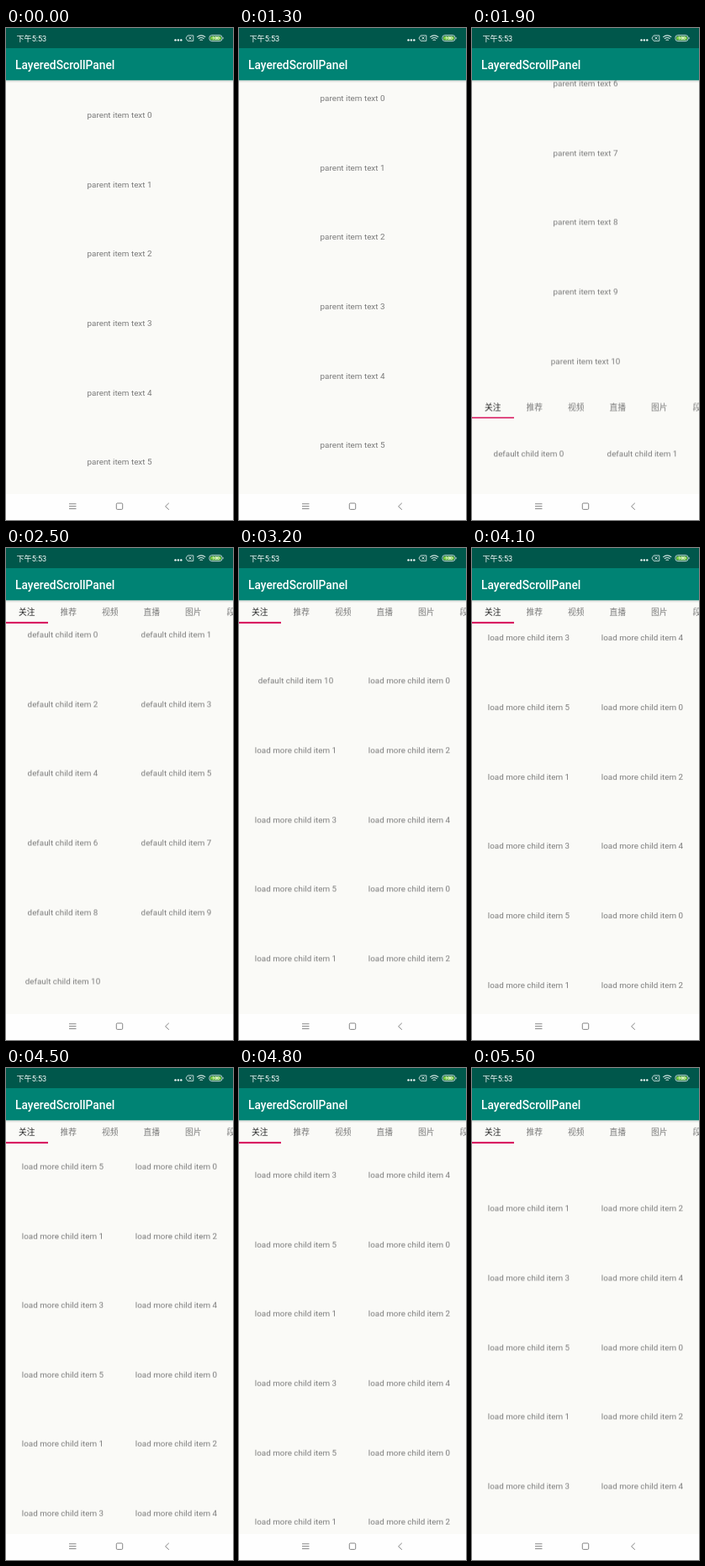
Recreate the animation shown at these times as an HTML page. Size 270 px wide and 586 px high, loop 5.6 s.

```html
<!DOCTYPE html>
<html lang="zh">
<head>
<meta charset="utf-8">
<style>
  html, body { margin: 0; width: 100%; height: 100%; overflow: hidden; }
  body { position: relative; background: #fafaf7; color: #7a7a7a; font: 9.85px Roboto, "Noto Sans CJK SC", sans-serif; }
  #viewport, #clip, #chrome { position: absolute; left: 0; width: 270px; overflow: hidden; }
  #viewport { top: 62.3px; height: 492.7px; }
  #page, #list { position: absolute; top: 0; left: 0; width: 270px; will-change: transform; }
  .cell { position: relative; top: 1.1px; float: left; height: 82.65px; line-height: 82.65px; text-align: center; white-space: pre; }
  #page > .cell { width: 270px; }
  #list > .cell { width: 135px; }
  #list:not(.loaded) > .more { visibility: hidden; }
  #tabs { clear: both; position: relative; height: 27.5px; width: 270px; overflow: hidden; white-space: nowrap; line-height: 29.5px; font-size: 0; }
  #tabs span { display: inline-block; width: 49.5px; text-align: center; font-size: 9.75px; }
  #tabs span:first-child { color: #222; }
  #tabs::after { content: ""; position: absolute; left: 0; bottom: 0; width: 49.5px; height: 1.5px; background: #d81b60; }
  #clip { height: 465.2px; }
  #chrome { top: 0; height: 586px; }
</style>
</head>
<body>
<div id="viewport">
  <div id="page">
    <div id="tabs"></div>
    <div id="clip"><div id="list"></div></div>
  </div>
</div>
<svg id="chrome" width="270" height="586" viewBox="0 0 270 586">
  <defs>
    <linearGradient id="shade" x2="0" y2="1">
      <stop stop-color="#000" stop-opacity=".14"/>
      <stop offset="1" stop-color="#000" stop-opacity="0"/>
    </linearGradient>
  </defs>
  <rect y="62.3" width="270" height="3" fill="url(#shade)"/>
  <rect y="24" width="270" height="38.3" fill="#008374"/>
  <rect width="270" height="24" fill="#00574b"/>
  <rect y="555" width="270" height="31" fill="#fefefe"/>
  <g fill="#fff">
    <text x="12.5" y="15.8" font-size="9.1">下午5:53</text>
    <text x="11" y="49" font-size="13.75" font-weight="500">LayeredScrollPanel</text>
    <circle cx="201.5" cy="14.4" r="1.2"/>
    <circle cx="204.9" cy="14.4" r="1.2"/>
    <circle cx="208.3" cy="14.4" r="1.2"/>
  </g>
  <g fill="none" stroke="#d5e5e2" stroke-width=".9">
    <path d="M216.2 8.9H222.8V15.4H216.2L214 12.1ZM217.4 10.5l3.2 3.2m0-3.2l-3.2 3.2"/>
    <path d="M227.2 10.9q5-4 10 0M228.9 12.8q3.3-2.6 6.6 0M230.6 14.6q1.6-1.3 3.2 0" stroke-width="1.1"/>
    <rect x="241.9" y="8.6" width="15.2" height="7" rx="3"/>
  </g>
  <rect x="243" y="9.7" width="13" height="4.8" rx="2" fill="#78c943"/>
  <text x="249.6" y="14" font-size="5" font-weight="700" fill="#fff" text-anchor="middle">100</text>
  <path d="M258.1 11v2.2" stroke="#d5e5e2" stroke-width=".8"/>
  <g fill="none" stroke="#777" stroke-width=".9">
    <path d="M75 566.8h8.5M75 569.7h8.5M75 572.6h8.5M193.8 565.8l-4.2 4 4.2 4"/>
    <rect x="131.3" y="566" width="7.4" height="7.4" rx="1.2"/>
  </g>
</svg>
<script>
const ROW = 82.65, TAB_HEIGHT = 27.5, PARENTS = 11, DEFAULTS = 11, BATCH = 6, CHILDREN = 62;
const LOOP = 5600, STEP = 100;
const dock = PARENTS * ROW;
const $ = id => document.getElementById(id);

function makeText(tag, text, className = "") {
  const el = document.createElement(tag);
  el.className = className;
  el.textContent = text;
  return el;
}

for (let i = 0; i < PARENTS; i++)
  $("page").insertBefore(makeText("div", `parent item text ${i}`, "cell"), $("tabs"));
for (const name of ["关注", "推荐", "视频", "直播", "图片", "段子"])
  $("tabs").append(makeText("span", name));
for (let i = 0; i < CHILDREN; i++)
  $("list").append(i < DEFAULTS
    ? makeText("div", `default child item ${i}`, "cell")
    : makeText("div", `load more child item ${(i - DEFAULTS) % BATCH}`, "cell more"));
$("clip").style.top = dock + TAB_HEIGHT + "px";

// Nested scroll at which the default items run out and more are loaded.
const listEnd = Math.ceil(DEFAULTS / 2) * ROW - $("clip").offsetHeight;

// Two swipes as [time, total scroll]: the page first, then the nested list.
const path = [
  [1200, 0], [1300, 20], [1500, 190], [1800, 455], [2200, 750], [2500, 937.5],
  [3200, 1295.7], [3350, 1310], [3500, 1420], [3800, 1900], [4100, 2255.9],
  [4800, 2731.3], [5400, 2856.6]
];
const slopes = path.slice(1).map(([t, s], i) => (s - path[i][1]) / (t - path[i][0]));
const tangent = i => {
  const a = slopes[i - 1], b = slopes[i];
  return a && b ? 2 * a * b / (a + b) : 0;
};

// Monotone cubic interpolation keeps the fling free of backward motion.
function scrollAt(time) {
  if (time <= path[0][0]) return 0;
  const i = path.findIndex(([t]) => t >= time) - 1;
  if (i < 0) return path[path.length - 1][1];
  const [t0, s0] = path[i], [t1, s1] = path[i + 1];
  const span = t1 - t0, u = (time - t0) / span, v = 1 - u;
  return s0 * v * v * (1 + 2 * u) + s1 * u * u * (3 - 2 * u)
    + span * u * v * (v * tangent(i) - u * tangent(i + 1));
}

const shift = (id, y) => { $(id).style.transform = `translateY(${-y}px)`; };

const start = performance.now();
function draw() {
  const time = (performance.now() - start) % LOOP;
  const scroll = scrollAt(Math.floor(time / STEP) * STEP);
  shift("page", Math.min(scroll, dock));
  shift("list", Math.max(0, scroll - dock));
  $("list").classList.toggle("loaded", scroll - dock > listEnd);
  requestAnimationFrame(draw);
}
draw();
</script>
</body>
</html>
```
